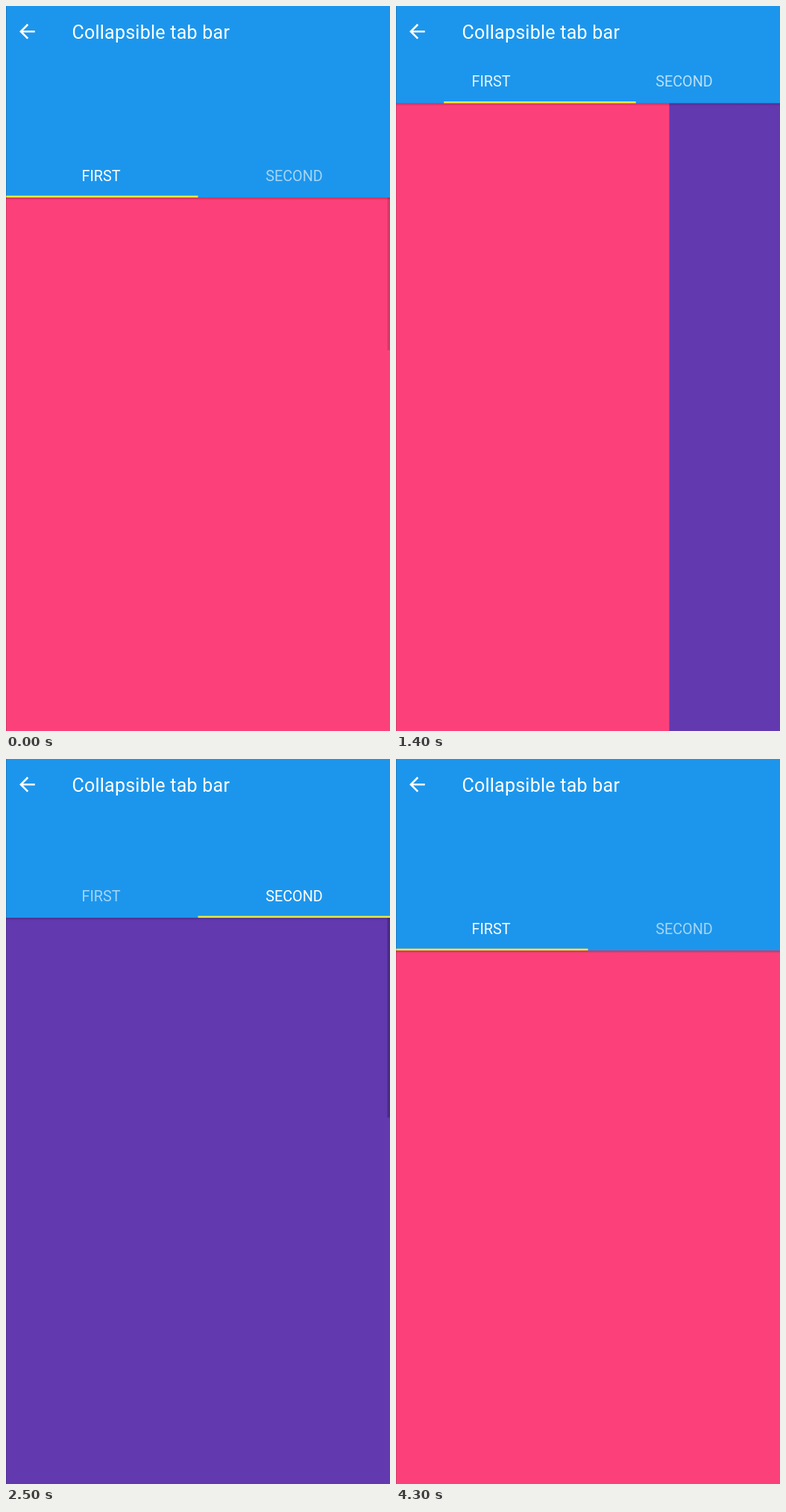
Recreate the animation shown at these times as an HTML page. Size 515 by 973 pixels, loop 4400 ms.

```html
<!DOCTYPE html>
<html lang="en">
<head>
<meta charset="utf-8">
<title>Collapsible tab bar</title>
<style>
  html, body { margin: 0; width: 100%; height: 100%; overflow: hidden; background: #fc417a; }
  svg { display: block; width: 100%; height: 100%; }
  text { font-family: Roboto, sans-serif; fill: #fff; }
  .title { font-size: 25px; letter-spacing: .25px; }
  .tab { font-size: 19.8px; }
</style>
</head>
<body>
<svg viewBox="0 0 515 973">
  <defs>
    <linearGradient id="shade" x2="0" y2="1">
      <stop offset="0" stop-opacity=".2"/>
      <stop offset="1" stop-opacity="0"/>
    </linearGradient>
  </defs>
  <g id="pages">
    <rect width="515" height="973" fill="#fc417a"/>
    <rect x="515" width="515" height="973" fill="#6339b0"/>
  </g>
  <rect id="thumb" x="511.5" width="3.5"/>
  <rect id="header" width="515" fill="#1c96ec"/>
  <g id="tabs">
    <rect width="515" height="4" fill="url(#shade)"/>
    <text id="first" class="tab" x="101.5" y="-22.5">FIRST</text>
    <text id="second" class="tab" x="348.2" y="-22.5">SECOND</text>
    <rect id="line" y="-2.5" width="257.5" height="2.5" fill="#f0e63c"/>
  </g>
  <path transform="translate(12.9 18.7) scale(1.29)" fill="#fff"
    d="M20 11H7.83l5.59-5.59L12 4l-8 8 8 8 1.41-1.41L7.83 13H20z"/>
  <text class="title" x="88.4" y="43.8">Collapsible tab bar</text>
  <rect width="1" height="973" opacity=".14"/>
</svg>
<script>
const LOOP = 4400, STEP = 100, WIDTH = 515;
const OPEN = 257, CLOSED = 130.5;
const $ = id => document.getElementById(id);
const set = (id, attrs) => {
  for (const name in attrs) $(id).setAttribute(name, attrs[name]);
};

const ramp = (t, from, to) => Math.min(1, Math.max(0, (t - from) / (to - from)));
const smooth = u => u * u * (3 - 2 * u);
const easeIn = u => u ** 1.2;
const easeOut = u => 1 - (1 - u) ** 1.8;

function draw(time) {
  const t = Math.floor(time % LOOP / STEP) * STEP;

  const collapsed = easeIn(ramp(t, 0, 500)) - easeOut(ramp(t, 2100, 3000));
  const height = OPEN + (CLOSED - OPEN) * collapsed;

  const page = smooth(ramp(t, 1125, 1900)) - smooth(ramp(t, 3500, 4300));
  const tab = page - .19 * page * (1 - page);

  // The first page keeps scrolling once the header is closed.
  const shift = 40 * ramp(t, 460, 660) * (1 - page);
  const thumbHeight = 205 + 1.44 * (OPEN - height);
  const shown = ramp(t, -150, 100) - ramp(t, 600, 800)
              + ramp(t, 2100, 2200) - ramp(t, 3300, 3700);

  set("pages", { transform: `translate(${-page * WIDTH} 0)` });
  set("header", { height });
  set("tabs", { transform: `translate(0 ${height})` });
  set("line", { x: tab * WIDTH / 2 });
  set("first", { "fill-opacity": 1 - .4 * tab });
  set("second", { "fill-opacity": .6 + .4 * tab });
  set("thumb", { y: height + shift, height: thumbHeight, opacity: .25 * shown });
}

const start = performance.now();
function tick() {
  draw(performance.now() - start);
  requestAnimationFrame(tick);
}
tick();
</script>
</body>
</html>
```
